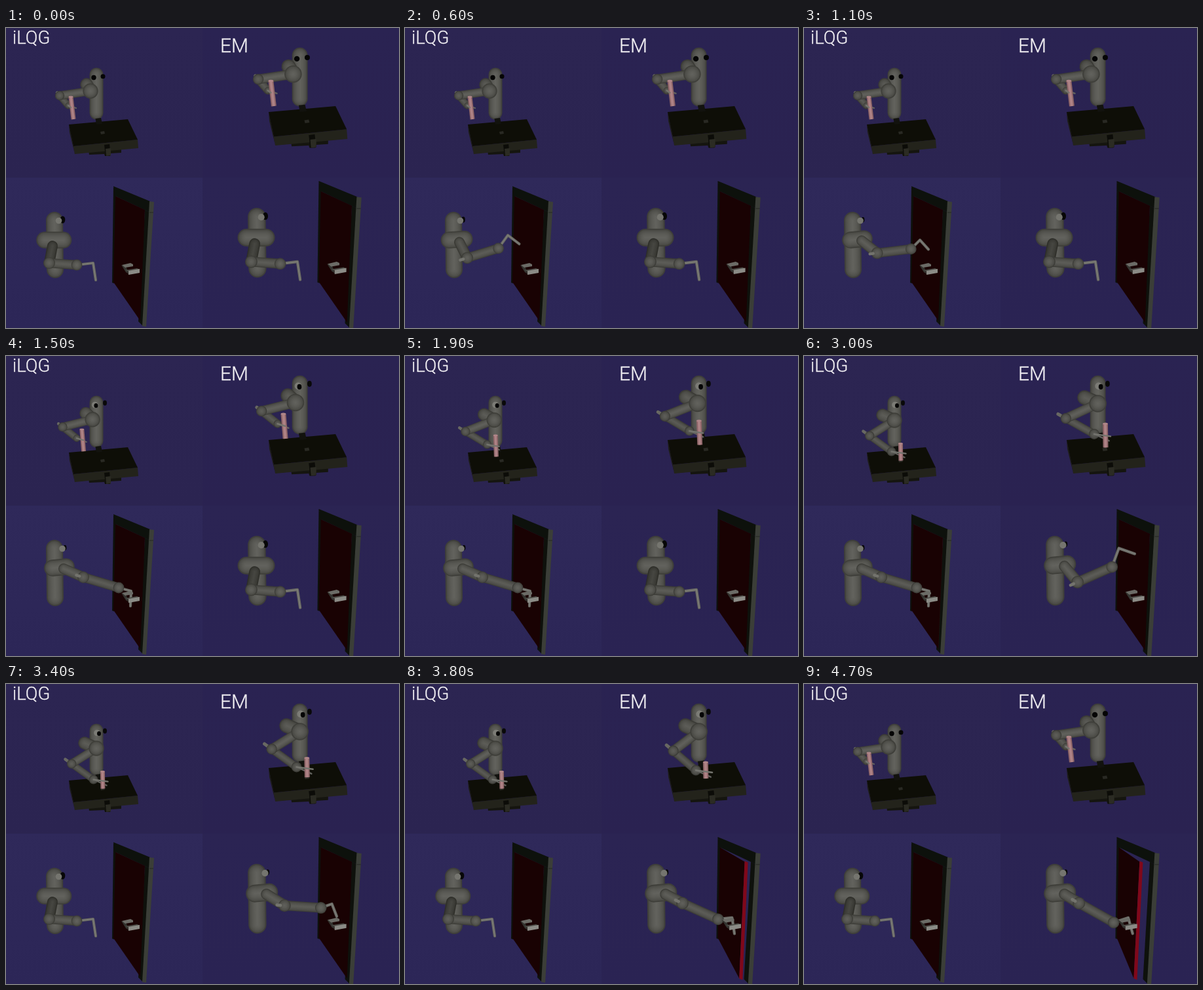
These frames come from a looping animation (600 px wide and 457 px high, 4.8 s). An HTML page with a canvas:

```html
<!DOCTYPE html>
<html lang="en">
<head>
<meta charset="utf-8">
<title>Robot arm tasks</title>
<style>
  html, body { margin: 0; width: 100%; height: 100%; overflow: hidden; background: #2b2453; }
  #stage { position: relative; width: 600px; height: 457px; overflow: hidden; }
  canvas { display: block; }
  .label { position: absolute; font-family: Roboto, "Open Sans", sans-serif; font-weight: 300; line-height: 1; color: #f2f0f4; -webkit-text-stroke: .3px #f2f0f4; white-space: pre; }
  #ilqg { left: 10px; top: 1px; font-size: 27.5px; }
  #em { left: 327px; top: 12px; font-size: 30px; }
</style>
</head>
<body>
<div id="stage">
  <canvas id="view" width="600" height="457"></canvas>
  <div class="label" id="ilqg">iLQG</div>
  <div class="label" id="em">EM</div>
</div>
<script>
const ctx = document.getElementById('view').getContext('2d');
const LOOP = 4800, STEP = 100;

// Key poses as points. Peg arm: elbow, hand, peg top, peg bottom
const REST = [[82, 103], [95, 118], [99, 105], [103, 139]];
const OVER = [[95, 118], [133, 139], [148, 125], [148.5, 157]];
const PRESSED = [[103.6, 124], [134, 150], [147, 139], [147.5, 161]];
// Door arm: elbow, hand, hook bend, hook tip
const READY = [[66, 358], [108, 361], [133, 358], [137, 384]];
const RAISED = [[107, 347], [157, 325], [167, 298], [190, 306]];
const GRIP = [[118, 337], [172, 353], [191, 358], [190, 381]];
// Shift of the gripping arm for each unit of door opening
const PULL = [[-.6, 0], [-.85, .8], [-.7, 0], [-.2, 0]];

const mix = (a, b, u) => a + (b - a) * u;
const mixPose = (a, b, u) => a.map((p, i) => p.map((v, k) => mix(v, b[i][k], u)));
const ramp = (t, from, to) => Math.min(1, Math.max(0, (t - from) / (to - from)));

function pegPose(t, pressAt, depth) {
  if (t >= 4350) return { pts: REST, turn: 0 };
  const reach = ramp(t, 1200, 2075);
  const press = depth * ramp(t, pressAt, pressAt + 500);
  return { pts: mixPose(mixPose(REST, OVER, reach), PRESSED, press), turn: reach };
}

function doorPose(t, open) {
  if (t >= 3350) return { pts: READY, turn: 0, open: 0 };
  const raise = ramp(t, 0, 850), grip = ramp(t, 850, 1450);
  const pts = mixPose(mixPose(READY, RAISED, raise), GRIP, grip)
    .map((p, i) => p.map((v, k) => v + open * PULL[i][k]));
  return { pts, turn: raise, open };
}

const springDoor = t => 7 * Math.sin(Math.PI * ramp(t, 2100, 2900));
const pulledDoor = t => 15 * (1 - Math.exp(-Math.max(0, t - 3600) / 220));

function poly(color, ...p) {
  ctx.beginPath();
  for (let i = 0; i < p.length; i += 2) ctx.lineTo(p[i], p[i + 1]);
  ctx.closePath();
  ctx.fillStyle = color;
  ctx.fill();
}

function line(color, width, cap, ...pts) {
  ctx.beginPath();
  for (const p of pts) ctx.lineTo(...p);
  ctx.strokeStyle = color;
  ctx.lineWidth = width;
  ctx.lineCap = cap;
  ctx.lineJoin = 'round';
  ctx.stroke();
}

function dot(color, x, y, rx, ry = rx) {
  ctx.beginPath();
  ctx.ellipse(x, y, rx, ry, 0, 0, 7);
  ctx.fillStyle = color;
  ctx.fill();
}

// Rounded limb, lighter towards its axis
function limb([x1, y1], [x2, y2], r, light = 98) {
  const layers = 7;
  for (let i = 0; i < layers; i++) {
    const u = i / (layers - 1);
    const v = Math.round(light * mix(.64, 1, Math.sqrt(u)));
    line(`rgb(${v},${v},${v - 5})`, 2 * r * (1 - .88 * u), 'round', [x1, y1], [x2 + .01, y2]);
  }
}

const ball = (p, r, light) => limb(p, p, r, light);

// Point reached by extending the forearm back past the elbow
function behind([ex, ey], [hx, hy], len) {
  const d = Math.hypot(hx - ex, hy - ey);
  return [ex - (hx - ex) / d * len, ey - (hy - ey) / d * len];
}

const offset = ([x, y], dx, dy) => [x + dx, y + dy];

function table() {
  poly('#15150f', 126, 187, 176, 182, 176, 190, 160, 191, 159, 195, 151, 195, 150, 192, 127, 193);
  poly('#1d1d16', 96, 147, 103, 180, 105, 192, 97, 159);
  poly('#23231b', 103, 180, 201, 170, 202, 183, 105, 192);
  poly('#0e0e07', 96, 147, 186, 139, 201, 170, 103, 180);
  poly('#0c0c08', 150, 178, 158, 177, 160, 194, 152, 195);
  poly('#2b2b23', 152, 184, 160, 183, 160, 194, 153, 195);
  poly('#292923', 144, 158, 150, 157, 151, 161, 145, 162);
}

function pegRobot({ pts: [elbow, hand, top, bottom], turn }) {
  const shoulder = [mix(129, 138, turn), mix(96, 98, turn)];
  table();
  limb([138, 71], [138, 129], 10.5);
  poly('#12120e', 136.5, 138, 145, 137, 147, 146, 138, 147);
  if (turn > .2) {
    dot('#090909', 151, 71.5, 3, 4);
    dot('#7c7c76', mix(134, 139, turn), 74.5, 4.8);
    dot('#050505', mix(135, 142, turn), 75.5, 3, 3.6);
  } else {
    dot('#050505', 134, 75.5, 3.7);
    dot('#050505', 148, 73.8, 3.5);
  }
  limb([mix(123, 120, turn), mix(86, 90, turn)], shoulder, 9.7, 92);
  line('#686862', 4.5, 'round', elbow, behind(elbow, hand, mix(6, 12, turn)));
  limb(elbow, hand, 5.5, 90);
  limb(shoulder, elbow, 6.5, 96);
  ball(elbow, 7.2, 94);
  ball(shoulder, 11.7);
  ball(hand, mix(4.5, 7, turn), 94);
  line('#62625e', 2.2, 'round', hand, offset(hand, mix(12, 20, turn), mix(4, 9, turn)));
  line('#8c6467', 7, 'butt', top, bottom);
  line('#ae8285', 3.6, 'butt', top, bottom);
  dot('#b08689', ...top, 3.4, 1.4);
  line('#74746e', 2.2, 'round', hand, offset(hand, mix(4, 22, turn), 3));
}

function door(open) {
  const tx = 212 - open, bx = 205 - open * 1.1;
  poly('#0e110c', 164, 241, 168, 255, 165, 389, 162, 388);
  poly('#0e110c', 212, 277, 220, 281, 209, 454, 202, 447);
  poly('#0d110c', 164, 241, 220, 264, 220, 281, 167, 256);
  poly('#190203', 167, 256, tx, 277, bx, 446, 164, 387);
  if (open > 0) {
    const w = Math.min(4.8, open * 1.5);
    poly('#80081a', tx, 276, tx + w, 278, bx + w, 448, bx, 446);
  }
  poly('#3b3e38', 219, 264, 226, 265, 214, 455, 208, 454);
  line('#20231e', .8, 'butt', [219, 281], [225, 281]);
}

function handle(shift) {
  ctx.save();
  ctx.translate(-shift, 0);
  poly('#33332f', 176, 361, 183, 363, 188, 375, 183, 372);
  poly('#6b6b66', 177, 361, 190, 358, 194, 360, 194, 363, 182, 365);
  poly('#4c4c47', 182, 369, 200, 366, 204, 368, 187, 371);
  poly('#8b8b86', 187, 370, 204, 367, 204, 373, 187, 376);
  ctx.restore();
}

function doorRobot({ pts: [elbow, hand, bend, tip], turn, open }) {
  door(open);
  limb([74, 293], [75, 368], 13);
  dot('#070707', mix(86.5, 90, turn), 292, mix(3.8, 2.4, turn), mix(5.5, 4, turn));
  dot('#75756f', mix(80.5, 86, turn), 293.5, 4.8);
  limb([mix(59, 71, turn), 323], [mix(87.5, 92, turn), mix(323, 321, turn)], 12.8);
  limb([mix(71, 88, turn), mix(332, 324, turn)], elbow, 8, mix(70, 94, turn));
  limb(elbow, hand, 7.2, 92);
  ball(elbow, 9, 96);
  if (turn > .4) line('#73736d', 4.5, 'round', behind(elbow, hand, 6), behind(elbow, hand, 11));
  line('#64645f', 4.2, 'round', hand, bend, tip);
  line('#7a7a75', 2, 'round', hand, bend, tip);
  ball(hand, 8.4);
  handle(open * .7);
}

function panel(x, y, h, top, bottom, scale, dx, dy, draw) {
  ctx.save();
  ctx.beginPath();
  ctx.rect(x, y, 300, h);
  ctx.clip();
  const g = ctx.createLinearGradient(0, y, 0, y + h);
  g.addColorStop(0, top);
  g.addColorStop(1, bottom);
  ctx.fillStyle = g;
  ctx.fillRect(x, y, 300, h);
  ctx.translate(dx, dy);
  ctx.scale(scale, scale);
  draw();
  ctx.restore();
}

function frame(now) {
  const t = Math.floor(now % LOOP / STEP) * STEP;
  panel(0, 0, 228, '#2c2552', '#2b2451', 1, 0, 0, () => pegRobot(pegPose(t, 2450, .6)));
  panel(300, 0, 228, '#2a2352', '#2a2251', 1.135, 292, -38.8, () => pegRobot(pegPose(t, 3100, 1)));
  panel(0, 228, 229, '#2f295a', '#2c2657', 1, 0, 0, () => doorRobot(doorPose(t, springDoor(t))));
  panel(300, 228, 229, '#2b2453', '#2a2353', 1.052, 305, -20.6, () => doorRobot(doorPose(t - 2150, pulledDoor(t))));
}

const start = performance.now();
function tick() {
  frame(performance.now() - start);
  requestAnimationFrame(tick);
}
tick();
</script>
</body>
</html>
```
